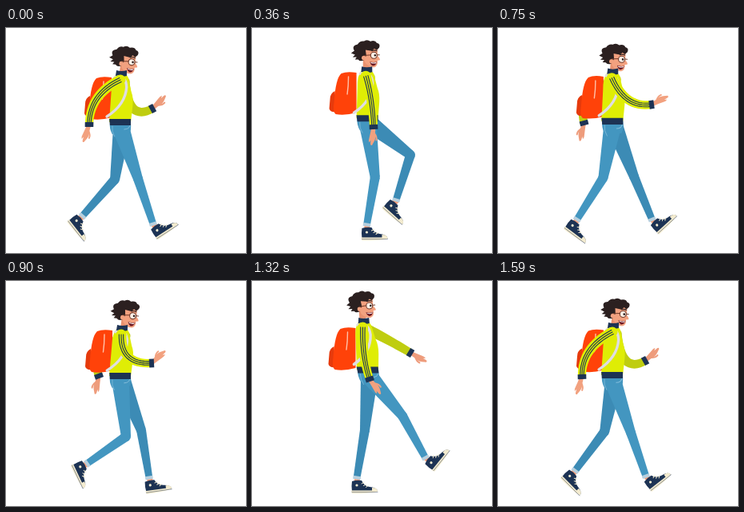
Write an HTML page with a canvas that moves like this. It is 300x282 px and loops after 1620 ms.

```html
<!DOCTYPE html>
<html lang="en">
<head>
<meta charset="utf-8">
<title>Walk cycle</title>
<style>
html, body { margin: 0; width: 100%; height: 100%; overflow: hidden; background: #fff; }
canvas { display: block; width: 300px; height: 282px; }
</style>
</head>
<body>
<canvas id="stage"></canvas>
<script>
const LOOP = 1620, STEP = LOOP / 2, TICK = 30;
const canvas = document.getElementById('stage');
const ctx = canvas.getContext('2d');
const ratio = window.devicePixelRatio || 1;
canvas.width = 300 * ratio;
canvas.height = 282 * ratio;

const C = {
  yellow: '#dfed05', olive: '#bfcd10', navy: '#1d3354', jeans: '#4396c0',
  farJeans: '#3c8bb5', light: '#83bddb', red: '#ff4209', darkRed: '#e63a0c',
  strap: '#dfdde3', skin: '#f2a17f', farSkin: '#ee9c7c', hair: '#2b2020',
  cream: '#f3ebcf', cuff: '#b7d0df'
};

// Each row: time, then values. Smooth periodic interpolation through the rows.
function track(period, rows) {
  const n = rows.length;
  const row = i => {
    const wrap = Math.floor(i / n), r = rows[i - wrap * n];
    return [r[0] + wrap * period, ...r.slice(1)];
  };
  return time => {
    const t = ((time % period) + period) % period;
    let i = n - 1;
    while (i > 0 && rows[i][0] > t) i--;
    const [a, b, c, d] = [row(i - 1), row(i), row(i + 1), row(i + 2)];
    const h = c[0] - b[0], u = (t - b[0]) / h, u2 = u * u, u3 = u2 * u;
    return b.slice(1).map((v, k) => {
      const j = k + 1;
      const m0 = (c[j] - a[j]) / (c[0] - a[0]) * h;
      const m1 = (d[j] - b[j]) / (d[0] - b[0]) * h;
      return (2 * u3 - 3 * u2 + 1) * v + (u3 - 2 * u2 + u) * m0
        + (3 * u2 - 2 * u3) * c[j] + (u3 - u2) * m1;
    });
  };
}

// hem x, y, collar x, y
const torsoAt = track(STEP, [
  [0, 143, 118, 144, 56], [90, 143, 119, 145, 58], [345, 144.5, 113.5, 143.5, 51.5],
  [510, 145, 111.5, 139.5, 49], [600, 145, 110, 139, 48], [690, 144, 114, 141.5, 51],
  [780, 143, 118, 144, 55]
]);
// neck x, y, tilt
const headAt = track(STEP, [
  [0, 146.5, 59, 7], [90, 148, 60, 7], [345, 144, 52, 1], [510, 139.5, 49, -4],
  [600, 139, 48, -5], [690, 142, 52, 1], [780, 146, 58, 6]
]);
const packAt = track(STEP, [
  [0, 98, 61], [90, 99, 61], [345, 96.7, 55], [510, 95.5, 58], [600, 97, 57], [780, 98, 60.5]
]);
// knee x, y, ankle x, y, foot pitch
const legAt = track(LOOP, [
  [0, 165, 189, 184, 246, -33], [90, 169, 187, 179, 247, -8], [180, 167, 187, 167, 247, 0],
  [345, 155, 187, 145, 247, 0], [510, 141, 187, 131, 247, 0], [600, 133, 186, 120, 246, 1],
  [690, 130, 187, 106, 244, 20], [795, 134.5, 189, 95.5, 237, 49],
  [900, 150, 195, 101, 229, 65], [1020, 177, 178, 128, 214, 68],
  [1140, 196, 158, 174, 216, 50], [1170, 198, 159, 180, 216, 42],
  [1245, 196, 164, 202, 222, -8], [1320, 188, 169, 217, 222, -51],
  [1410, 190, 165, 222, 217, -57], [1500, 179, 177, 209, 230, -50],
  [1590, 166, 190, 185, 245, -38]
]);
// elbow x, y, wrist x, y, fingertip x, y
const nearArm = track(LOOP, [
  [0, 114, 88, 104, 121, 97, 141], [90, 118, 92, 111, 123, 106, 144],
  [225, 134, 93, 131, 125, 126, 147], [360, 149, 91, 152, 124, 149, 147],
  [480, 161, 86, 181, 110, 194, 129], [600, 168, 76, 198, 92, 220, 105],
  [750, 163, 90, 192, 96, 212, 86], [900, 153, 95, 182, 103, 200, 87],
  [1020, 150, 98, 173, 111, 195, 108], [1140, 143, 94, 158, 116, 181, 124],
  [1320, 140, 92, 147, 123, 160, 141], [1450, 124, 91, 119, 123, 117, 146],
  [1590, 114, 88, 105, 120, 98, 141]
]);
const farArm = track(LOOP, [
  [0, 159, 101, 183, 101, 201, 83], [120, 154, 101, 174, 110, 194, 108],
  [360, 146, 92, 150, 121, 148, 144], [480, 126, 92, 126, 122, 127, 145],
  [600, 118, 90, 117, 119, 121, 144], [780, 113, 90, 107, 119, 101, 140],
  [900, 119, 92, 116, 119, 112, 140], [1020, 144, 94, 148, 122, 148, 145],
  [1140, 166, 90, 180, 112, 184, 136], [1320, 172, 75, 198, 90, 222, 103],
  [1450, 167, 88, 194, 95, 216, 91], [1590, 160, 100, 184, 100, 202, 83]
]);

function fill(path, color) {
  ctx.fillStyle = color;
  ctx.fill(new Path2D(path));
}
function line(path, color, width) {
  ctx.strokeStyle = color;
  ctx.lineWidth = width;
  ctx.stroke(new Path2D(path));
}
function dot(x, y, r, color) {
  ctx.fillStyle = color;
  ctx.beginPath();
  ctx.arc(x, y, r, 0, 2 * Math.PI);
  ctx.fill();
}
function local(x, y, angle, draw) {
  ctx.save();
  ctx.translate(x, y);
  ctx.rotate(angle);
  draw();
  ctx.restore();
}

function taper(ax, ay, ra, bx, by, rb, color) {
  const len = Math.hypot(bx - ax, by - ay);
  const nx = (ay - by) / len, ny = (bx - ax) / len;
  fill(`M${ax + nx * ra} ${ay + ny * ra}L${bx + nx * rb} ${by + ny * rb}
    L${bx - nx * rb} ${by - ny * rb}L${ax - nx * ra} ${ay - ny * ra}Z`, color);
}

function shoe() {
  fill('M-3-2H4V6H-3Z', C.skin);
  fill('M-6 4Q0 2 6 3Q9 10 16 11Q26 12 26 17H-6Q-7 10-6 4Z', C.navy);
  fill('M19 12Q26 12 26 17H19Z', C.cream);
  fill('M-7 15.5H26Q27 19-1 19.3H-6Z', C.cream);
  line('M-6 17.6H26', '#35435a', .5);
  line('M6 7L9 5.5M8.5 9.5L11.5 8M11.5 11.5L14 9.5', C.cream, 1);
  dot(0, 9, 1.6, C.cream);
}

function leg(time, hx, hy, color) {
  const [kx, ky, ax, ay, pitch] = legAt(time);
  local(ax, ay, pitch * Math.PI / 180, shoe);
  dot(hx, hy, 11, color);
  taper(hx, hy, 11, kx, ky, 6, color);
  dot(kx, ky, 6, color);
  taper(kx, ky, 6, ax, ay, 4.3, color);
  local(ax, ay, Math.atan2(ay - ky, ax - kx), () => fill('M-2.5-4.7H1.5V4.7H-2.5Z', C.cuff));
}

function hand(x, y, angle, flip, color) {
  local(x, y, angle, () => {
    ctx.scale(1, flip);
    fill('M0-2.4L8-3Q13-5 18-3L23-1Q24 1 21 1.3L17 1.5L20 3Q18 4.5 14 3.6L8 3L0 2.4Z', color);
    line('M8-2Q12-6 16-5.5', color, 2);
  });
}

function arm([ex, ey, wx, wy, tx, ty], sx, sy, near) {
  // Curve that passes through the elbow at its middle.
  const cx = 2 * ex - (sx + wx) / 2, cy = 2 * ey - (sy + wy) / 2;
  const edge = (w0, w1) => {
    const pts = [];
    for (let i = 0; i <= 16; i++) {
      const u = i / 16, v = 1 - u;
      const dx = v * (cx - sx) + u * (wx - cx), dy = v * (cy - sy) + u * (wy - cy);
      const w = (w0 + (w1 - w0) * u) / (Math.hypot(dx, dy) || 1);
      pts.push([v * v * sx + 2 * u * v * cx + u * u * wx - dy * w,
                v * v * sy + 2 * u * v * cy + u * u * wy + dx * w]);
    }
    return pts;
  };
  const color = near ? C.yellow : C.olive;
  const turn = Math.atan2(wy - cy, wx - cx);
  hand(wx, wy, Math.atan2(ty - wy, tx - wx), near ? 1 : -1, near ? C.skin : C.farSkin);
  dot(sx, sy, 6.5, color);
  fill('M' + edge(6.5, 5).concat(edge(-6.5, -5).reverse()).join('L') + 'Z', color);
  if (near) {
    for (const o of [-2.7, 0, 2.7]) line('M' + edge(o, o * .8).join('L'), C.navy, 1.1);
  }
  local(wx, wy, turn, () => fill('M-3-5.3H3V5.3H-3Z', C.navy));
}

function pack() {
  fill('M7 24Q1 27 1 34L0 46Q1 51 9 50Z', C.darkRed);
  fill('M15 2Q22-1 34 1V51Q20 55 8 53Q4 50 6 38Q8 8 15 2Z', C.red);
  line('M24 6Q24 18 22.5 28', '#ffc0a8', 1.4);
}

function torso() {
  fill('M-13 0H13Q14 10 11 15H-10Q-14 8-13 0Z', C.jeans);
  line('M5 9Q11 9 12 4', C.light, 1);
  line('M-10 5Q-11 12-7 18', C.light, .8);
  fill('M-7-59Q-12-54-12-38L-14 0H13L15-20Q16-31 13-38L9-55Q8-59 5-59Z', C.yellow);
  fill('M-14-4H13V4H-13Z', C.navy);
  fill('M-6-65Q0-63 7-65L7-58Q0-56-7-58Z', C.navy);
  line('M-8-56Q6-60 7-44Q6-22-17-7', C.strap, 3.4);
}

function head() {
  fill('M-5-14H5L4-3Q0 0-5-2Z', '#e8916f');
  fill('M-5-26H13L13-17Q17-13 16-11.5L13-11Q14-4 9-2.5Q2-2-3-9Z', C.skin);
  fill(`M-2-24L-1-17L-4-11Q-9-9-11-12L-15-12L-13-15L-18-15L-15-18L-20-20L-16-23
    Q-19-28-15-30L-12-31Q-9-36-4-35Q0-38 4-35Q10-37 12-33Q17-32 15-27
    L12-24L9-26L6-23Z`, C.hair);
  dot(-4, -14, 2.8, C.skin);
  line('M-4-17L5-18', '#713b2a', 1);
  ctx.beginPath();
  ctx.arc(8.5, -17.5, 4, 0, 2 * Math.PI);
  ctx.fillStyle = '#fff0e6';
  ctx.fill();
  ctx.strokeStyle = '#713b2a';
  ctx.lineWidth = 1.1;
  ctx.stroke();
  line('M13-18H15.5', '#713b2a', 1);
  dot(10, -17.5, 1.3, C.hair);
  line('M6-23Q9-24.5 12-23', C.hair, 1.2);
  fill('M3.5-9.5Q8-8 12.5-9.5Q11-4 7-4.5Q4.5-5.5 3.5-9.5Z', '#6d1720');
  fill('M4.5-9Q8-7.5 12-9L11.4-7.6Q8-6.6 5-7.8Z', '#fff');
}

function draw(time) {
  ctx.setTransform(ratio, 0, 0, ratio, 0, 0);
  ctx.fillStyle = '#fff';
  ctx.fillRect(0, 0, 300, 282);
  ctx.lineCap = ctx.lineJoin = 'round';

  const [mx, my, cx, cy] = torsoAt(time);
  const [hx, hy, tilt] = headAt(time);
  const [px, py] = packAt(time);

  arm(farArm(time), cx + 4, cy + 11, false);
  leg(time + STEP, mx + 2, my + 6, C.farJeans);
  leg(time, mx, my + 6, C.jeans);
  local(px, py, 0, pack);
  local(hx, hy, tilt * Math.PI / 180, head);
  ctx.save();
  ctx.transform(1, 0, (mx - cx) / 62, (my - cy) / 62, mx, my);
  torso();
  ctx.restore();
  arm(nearArm(time), cx - 1, cy + 9, true);
}

const start = performance.now();
function frame() {
  const t = (performance.now() - start) % LOOP;
  draw(Math.floor(t / TICK) * TICK);
  requestAnimationFrame(frame);
}
frame();
</script>
</body>
</html>
```
